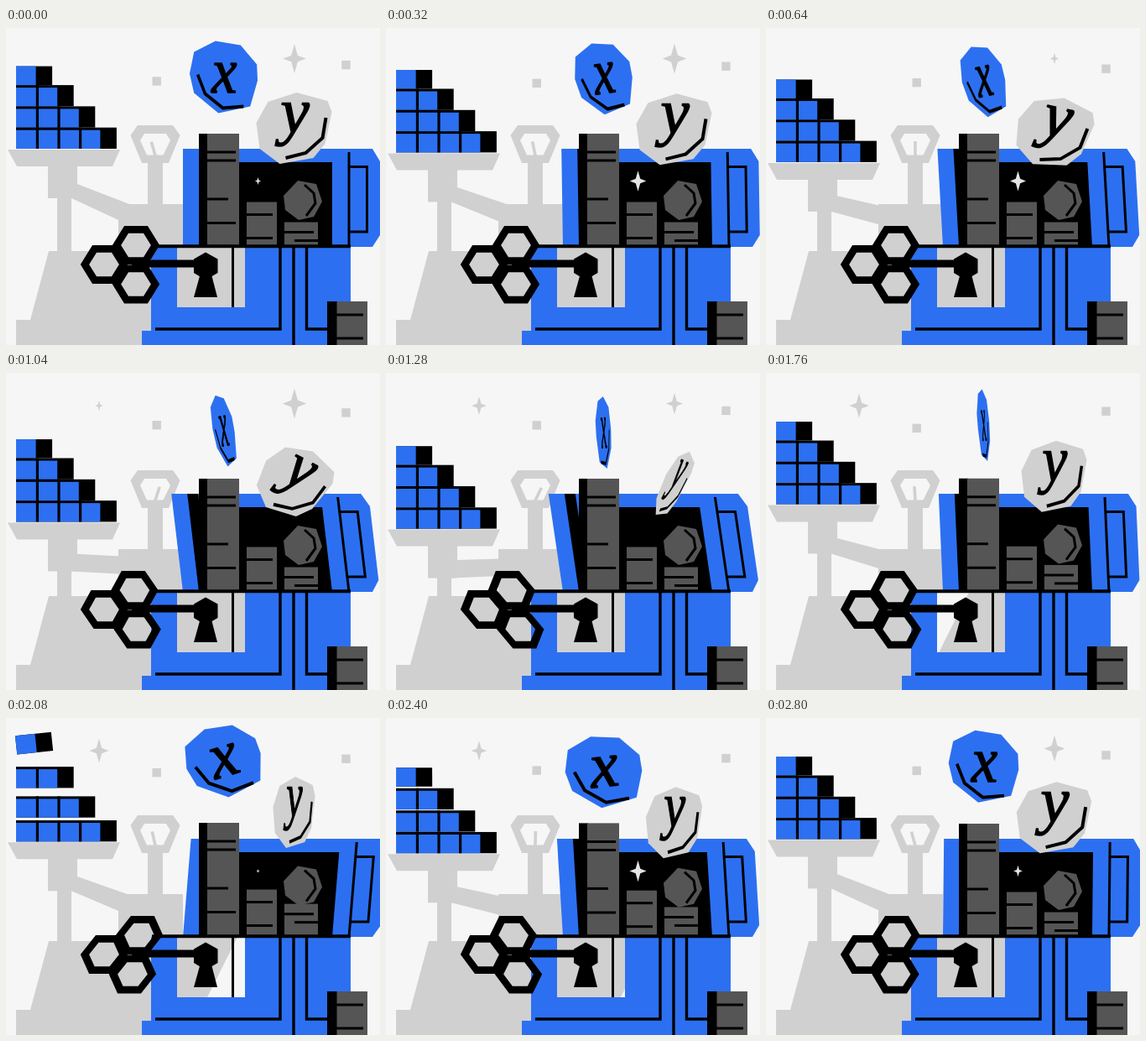
An HTML page with a canvas that plays this animation: 446 px wide and 378 px high, repeating every 2880 ms.

```html
<!DOCTYPE html>
<html lang="en">
<head>
<meta charset="utf-8">
<title>Treasure chest of variables</title>
<style>
  html, body { margin: 0; width: 100%; height: 100%; overflow: hidden; background: #f6f6f6; }
  canvas { display: block; }
</style>
</head>
<body>
<canvas id="stage" width="446" height="378"></canvas>
<script>
const ctx = document.getElementById('stage').getContext('2d');
const LOOP = 2880, STEP = 80, RELEASE = 1600;
const PAPER = '#f6f6f6', BLUE = '#2c70f1', GREY = '#d0d0d0', DARK = '#555', BLACK = '#000';

// Timing
const clamp = u => Math.min(1, Math.max(0, u));
const ease = u => 0.5 - 0.5 * Math.cos(Math.PI * clamp(u));
const arc = (t, from, to) => {
  const u = clamp((t - from) / (to - from));
  return 4 * u * (1 - u);
};
// Slow wind-up from 0 to 1, then a fading swing back to rest.
const wave = (t, start = 0) => t < RELEASE
  ? ease((t - start) / (RELEASE - start))
  : Math.cos(2 * Math.PI * (t - RELEASE) / 800) * (LOOP - t) / (LOOP - RELEASE);
const bob = (t, peak) => Math.cos(4 * Math.PI * (t - peak) / LOOP);
const lateWave = t => wave(t, 800);

// Drawing
function trace(p, closed) {
  ctx.beginPath();
  for (let i = 0; i < p.length; i += 2) ctx.lineTo(p[i], p[i + 1]);
  if (closed) ctx.closePath();
}
function poly(fill, ...p) {
  trace(p, true);
  ctx.fillStyle = fill;
  ctx.fill();
}
function line(width, ...p) {
  trace(p);
  ctx.lineWidth = width;
  ctx.strokeStyle = BLACK;
  ctx.stroke();
}
function box(fill, x1, y1, x2, y2) {
  ctx.fillStyle = fill;
  ctx.fillRect(x1, y1, x2 - x1, y2 - y1);
}
function inside(draw) {
  ctx.save();
  draw();
  ctx.restore();
}
const stripe = (x1, x2, y) => line(3, x1, y, x2, y);
const turnBy = deg => ctx.rotate(deg * Math.PI / 180);
// Horizontal skew that keeps the given height fixed.
const skew = (k, y) => ctx.transform(1, 0, k, 1, -k * y, 0);

function dot(x, y) {
  box(GREY, x - 5.2, y - 5.2, x + 5.2, y + 5.2);
}

// Each twinkle opens and closes once, and may run past the end of the loop.
function twinkle(t, fill, x, y, size, from, length) {
  const u = (t - from + LOOP) % LOOP / length;
  if (u >= 1) return;
  const r = size * Math.sqrt(Math.sin(Math.PI * u)), w = r * 0.79, n = r * 0.22;
  poly(fill, x, y - r, x + n, y - n, x + w, y, x + n, y + n,
    x, y + r, x - n, y + n, x - w, y, x - n, y - n);
}

function sky(t) {
  dot(179.7, 64 + 2 * bob(t, 420));
  dot(405.5, 46.5 + 2.5 * bob(t, 760));
  twinkle(t, GREY, 344, 36.5, 19, 2560, 1000);
  twinkle(t, GREY, 344, 36.5, 18, 680, 720);
  twinkle(t, GREY, 111, 39, 15, 940, 1860);
}

function scales(p) {
  const d = p - 145;
  box(GREY, 134, 210, 211, 270);
  poly(GREY, 51, 266, 175, 266, 175, 378, 12, 378, 12, 348, 29, 348);
  box(GREY, 61, p + 20, 78, 268);
  box(GREY, 50, p + 18, 85, p + 58);
  poly(GREY, 85, p + 41 - d * 0.11, 160, 215 + d * 0.14, 160, 241, 78, p + 58);
  poly(GREY, 2, p, 136, p, 127, p + 20, 13, p + 20);

  box(GREY, 169, 158, 187, 212);
  poly(GREY, 157, 116, 199, 116, 207.5, 128, 194, 161, 162, 161, 148.5, 128);
  poly(PAPER, 165, 126, 191, 126, 196, 134, 187.5, 151.5, 168, 151.5, 160, 134);
  inside(() => {
    ctx.translate(178, 152);
    turnBy(p - 161);
    box(GREY, -1.8, -17, 1.8, 1);
  });
}

// Stairs of blocks; the higher the row, the further it is thrown.
function blocks(base, toss) {
  for (let n = 1; n <= 4; n++) {
    const level = 4 - n, top = n === 1;
    const bottom = base - 25.3 * level - 30 * toss * (level / 3) ** 2;
    const height = top ? 22.5 : 25.3;
    const edge = 10 + 25.6 * n;
    inside(() => {
      ctx.translate(33, bottom - height / 2);
      if (top) turnBy(-6 * toss * toss);
      ctx.translate(-33, -height / 2);
      box(BLACK, 12, 0, edge + 19.5, height);
      box(BLUE, 12, top ? 0 : 3, edge, height);
      for (let i = 1; i < n; i++) box(BLACK, 10.2 + 25.6 * i, 0, 13.4 + 25.6 * i, height);
    });
  }
}

function lid(lean) {
  inside(() => {
    skew(lean / 117, 261);
    poly(BLUE, 211, 144, 437, 144, 446, 159, 446, 247, 437, 261, 211, 261);
    box(BLACK, 230, 144, 243, 261);
    box(BLACK, 258, 160, 389, 261);
    line(3, 409, 148, 409, 261);
    line(3, 410, 165.5, 430.5, 165.5, 430.5, 243, 410, 243);
  });
}

// A pile hops up while its foot stays on the floor of the chest.
function pile(x1, x2, top, hop, drawStripes) {
  box(DARK, x1, top - hop, x2, 259);
  inside(() => {
    ctx.translate(0, -hop);
    drawStripes();
  });
}

function treasure(t) {
  const hop = 10 * arc(t, 1700, 2560);
  box(BLACK, 230, 126 - hop / 10, 241, 260);
  pile(240, 278, 126, hop / 10, () => {
    for (const y of [148, 158, 232.5]) stripe(240, 274, y);
    stripe(240, 265, 204);
  });
  pile(287, 323, 207.5, hop * 0.3, () => {
    for (const y of [222.5, 250.5]) stripe(287, 318, y);
  });
  inside(() => {
    ctx.translate(0, -hop * 0.55);
    poly(DARK, 348, 182, 370, 186, 377, 207, 367, 225, 349, 229, 333, 217, 331, 200);
    line(3, 356, 187, 367, 197, 369, 209, 358, 224);
  });
  pile(332, 372, 231.5, hop, () => {
    stripe(332, 367, 243.5);
    stripe(344, 372, 253.5);
  });
  twinkle(t, '#e4e4e4', 300.5, 182.5, 13, 2070, 800);
  twinkle(t, '#e4e4e4', 300.5, 182.5, 13, 2840, 1000);
}

function chest(t) {
  box(BLUE, 173, 261, 411, 378);
  box(BLUE, 162, 361, 175, 378);
  inside(() => {
    const left = 1 - clamp((t - 1640) / 920);
    const g = 285 - 165 * left * left;
    ctx.beginPath();
    ctx.rect(204, 261, 81, 72);
    ctx.clip();
    box(GREY, 204, 261, 285, 333);
    poly(PAPER, g, 333, g + 36, 261, g + 82, 261, g + 46, 333);
  });
  line(3, 270.5, 261, 270.5, 333);
  line(3.4, 327, 261, 327, 359, 178, 359);
  line(3.4, 343, 261, 343, 378);
  line(3.4, 358.5, 261, 358.5, 359, 386, 359);
  line(4, 174, 260.3, 411, 260.3);
  box(BLACK, 383, 326, 395, 378);
  box(DARK, 394.5, 326, 431, 378);
  for (const y of [342, 370]) stripe(394, 426, y);
}

function ringHex(x, y) {
  const p = [];
  for (let a = 0; a < 6; a++) {
    p.push(x + 23 * Math.cos(a * Math.PI / 3), y + 21.4 * Math.sin(a * Math.PI / 3));
  }
  trace(p, true);
  ctx.lineWidth = 8.8;
  ctx.strokeStyle = BLACK;
  ctx.stroke();
}

function key(k) {
  poly(BLACK, 238, 267.5, 252.5, 275.5, 252.5, 292, 238, 300.5, 224, 292, 224, 275.5);
  poly(BLACK, 231.5, 294, 245, 294, 252, 321, 224, 321);
  line(9, 150, 281, 226, 281);
  inside(() => {
    skew(k, 282);
    ringHex(155, 259);
    ringHex(117, 282);
    ringHex(155, 305.5);
  });
}

function coin(fill, letter, x, y, turn, tilt, look) {
  const squeeze = Math.cos(turn * Math.PI / 180);
  inside(() => {
    ctx.translate(x, y);
    turnBy(tilt);
    ctx.scale(squeeze, 1);
    poly(fill, ...look.rim);
    line(4, ...look.mark);
    // The letter reads correctly on both faces.
    if (squeeze < 0) ctx.scale(-1, 1);
    ctx.font = 'italic 77px "Liberation Serif", "Times New Roman", serif';
    ctx.textAlign = 'center';
    ctx.fillStyle = BLACK;
    ctx.fillText(letter, 1, look.baseline);
    ctx.lineWidth = 1.6;
    ctx.strokeText(letter, 1, look.baseline);
  });
}

const X_COIN = {
  baseline: 18,
  rim: [-11, -43, 23, -38, 45, -15, 46, 4, 36, 35, -7, 43, -40, 19, -46, -4, -40, -30],
  mark: [-35, -3, -25, 20, -1, 37, 27, 35]
};
const Y_COIN = {
  baseline: 5,
  rim: [3, -43, 40, -33, 45, -20, 37, 18, 23, 35, -17, 42, -41, 24, -45, -7, -31, -32],
  mark: [38, -13, 34, 11, 14, 29, -10, 35]
};

// A slow drift, then one quick spin that completes the turn.
function driftAndSpin(t) {
  const s = (t - 2240 + LOOP) % LOOP;
  return 74 * clamp(s / 1680) + 286 * ease((s - 1680) / 1200);
}

function coins(t) {
  const drop = 14 * wave(t);
  coin(BLUE, 'x', 259.5, 58.5 + drop, driftAndSpin(t),
    -12 * arc(t, 0, 1400) - 17 * arc(t, 1700, 2480), X_COIN);
  coin(GREY, 'y', 343.5, 120 + drop, 111 * lateWave(t),
    28 * arc(t, 500, 1640), Y_COIN);
}

function frame() {
  const t = Math.floor(performance.now() % LOOP / STEP) * STEP;
  const load = wave(t);
  // The pan meets a stop on its way up and only bounces a little.
  const pan = 145 + 46 * Math.max(load, -load / 7);
  box(PAPER, 0, 0, 446, 378);
  sky(t);
  scales(pan);
  blocks(pan - 1, arc(t, 1760, 2420));
  lid(19 * load);
  treasure(t);
  chest(t);
  key(0.34 * lateWave(t));
  coins(t);
  requestAnimationFrame(frame);
}
frame();
</script>
</body>
</html>
```
